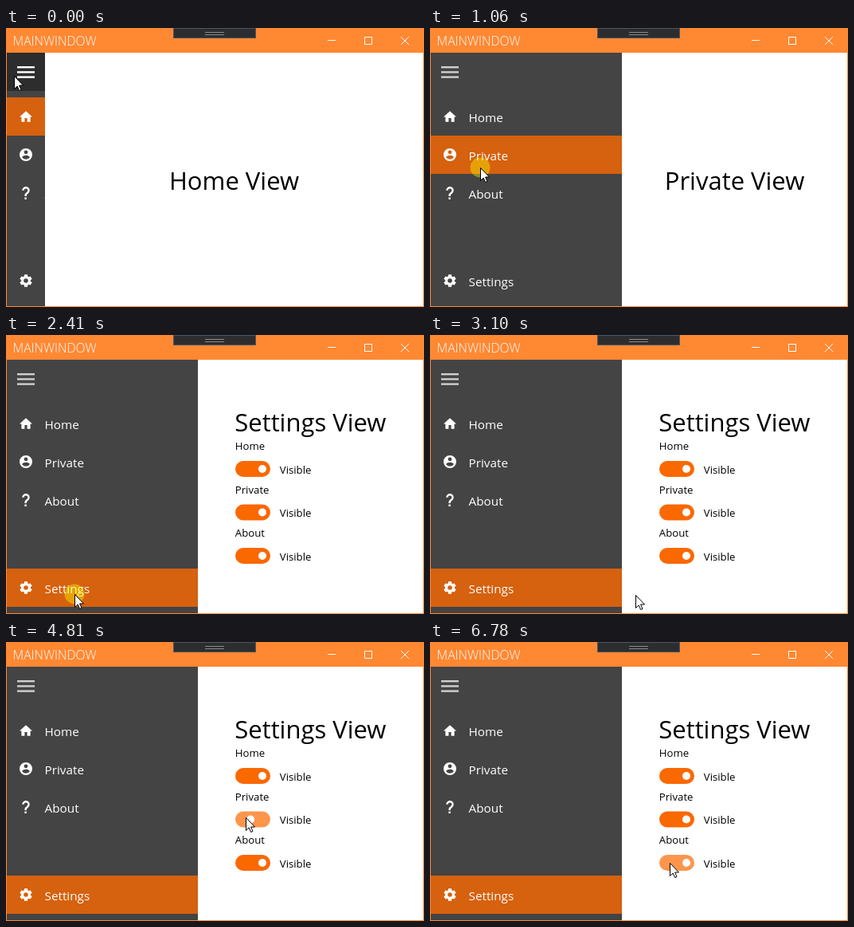
Write an HTML page with a canvas that moves like this. It is 525 by 350 pixels and loops after 7930 ms.

```html
<!DOCTYPE html>
<html lang="en">
<head>
<meta charset="utf-8">
<title>Main window</title>
<style>
  html, body { margin: 0; width: 100%; height: 100%; overflow: hidden; background: #fff; }
  canvas { display: block; }
</style>
</head>
<body>
<canvas id="stage" width="525" height="350"></canvas>
<script>
const ctx = document.getElementById('stage').getContext('2d');
const LOOP = 7930, OPEN_TIME = 350, SLIDE_TIME = 240;
const FONT = '"Open Sans", "Noto Sans", sans-serif';
const ACCENT = '#fa6800', TITLE_BAR = '#ff8833', SELECTED = '#d6610e', PANE = '#444444';
const PAGES = ['Home', 'Private', 'About'];

const smooth = p => p * p * (3 - 2 * p);
const easeOut = p => 1 - (1 - p) ** 3;
const clamp = p => Math.max(0, Math.min(1, p));

// Pointer moves: each starts where the previous one ended
const moves = [
  { start: 40, end: 140, x: 20, y: 60 },
  { start: 400, end: 920, x: 63, y: 175 },
  { start: 1160, end: 1380, x: 67, y: 211 },
  { start: 1560, end: 1820, x: 70, y: 262 },
  { start: 1830, end: 2130, x: 86, y: 325 },
  { start: 2930, end: 3610, x: 301, y: 220, bend: { x: 290, y: 400 }, ease: easeOut },
  { start: 5100, end: 5550, x: 301, y: 277 }
];

// Selecting acts on press, everything else on release
const clicks = [
  { down: 200, up: 290, opens: true },
  { down: 1060, up: 1150, selects: 'Private' },
  { down: 1440, up: 1530, selects: 'About' },
  { down: 2410, up: 2450, selects: 'Settings' },
  { down: 3850, up: 4060, toggles: 'Private' },
  { down: 4630, up: 4720, toggles: 'Private' },
  { down: 5740, up: 5830, toggles: 'About' },
  { down: 6300, up: 6390, toggles: 'About' }
];
const openAt = clicks.find(c => c.opens).up;

// Icons on a 24 unit grid
const icons = {
  Home: new Path2D('M10,20.5v-6h4v6h5v-8h3L12,3.5L2,12.5h3v8Z'),
  Private: new Path2D('M2,12a10,10 0 1,0 20,0a10,10 0 1,0 -20,0M9,8a3,3 0 1,0 6,0a3,3 0 1,0 -6,0M6,16C6,14 10,12.9 12,12.9S18,14 18,16A7.2,7.2 0 0,1 6,16Z'),
  About: new Path2D('M10,19h3v3h-3ZM12,2C17.3,2.2 19.7,7.6 16.5,11.7C14.5,14 13,14 13,17h-3C10,12.5 11.5,12.3 13.5,10.7C15.9,8.4 15.3,5.3 12,5A3,3 0 0,0 9,8H6A6,6 0 0,1 12,2Z'),
  Settings: cogPath()
};
const arrow = new Path2D('M.5,.5V16.5L4.2,13L6.6,18.5L9,17.5L6.6,12H11.5Z');

function cogPath() {
  const path = new Path2D();
  for (let i = 0; i < 6; i++) {
    const middle = i * Math.PI / 3 - Math.PI / 2;
    for (const [r, turn] of [[7.4, -.4], [9.9, -.25], [9.9, .25], [7.4, .4]]) {
      path.lineTo(12 + r * Math.cos(middle + turn), 12 + r * Math.sin(middle + turn));
    }
  }
  path.closePath();
  path.moveTo(15.5, 12);
  path.arc(12, 12, 3.5, 0, 2 * Math.PI);
  return path;
}

function rect(x, y, w, h, color) {
  ctx.fillStyle = color;
  ctx.fillRect(x, y, w, h);
}

function circle(x, y, r, color) {
  ctx.fillStyle = color;
  ctx.beginPath();
  ctx.arc(x, y, r, 0, 2 * Math.PI);
  ctx.fill();
}

function text(str, x, y, size, color = '#000', align = 'left', weight = 400) {
  ctx.font = `${weight} ${size}px ${FONT}`;
  ctx.textAlign = align;
  ctx.fillStyle = color;
  ctx.fillText(str, x, y);
}

const inside = (p, x, y, w, h) => p.x >= x && p.x < x + w && p.y >= y && p.y < y + h;

function pointerAt(t) {
  let from = { x: 10, y: 60 };
  for (const to of moves) {
    if (t < to.start) break;
    const p = (to.ease || smooth)(clamp((t - to.start) / (to.end - to.start)));
    const bend = to.bend || { x: (from.x + to.x) / 2, y: (from.y + to.y) / 2 };
    const along = k => Math.round(
      from[k] * (1 - p) ** 2 + bend[k] * 2 * p * (1 - p) + to[k] * p * p);
    from = { x: along('x'), y: along('y') };
    if (t < to.end) break;
  }
  return from;
}

function viewAt(t) {
  const last = clicks.findLast(c => c.selects && c.down <= t);
  return last ? last.selects : 'Home';
}

function switchAt(name, t) {
  const done = clicks.filter(c => c.toggles === name && c.up <= t);
  const off = done.length % 2 === 1;
  const slide = done.length ? clamp((t - done.at(-1).up) / SLIDE_TIME) : 1;
  return { off, knob: off ? 322 - 24 * slide : 298 + 24 * slide };
}

function drawTitleBar() {
  rect(0, 0, 525, 31, TITLE_BAR);
  ctx.strokeStyle = TITLE_BAR;
  ctx.lineWidth = 1;
  ctx.strokeRect(.5, .5, 524, 349);
  text('MAINWINDOW', 8.5, 22, 15.8, '#fff', 'left', 300);

  ctx.strokeStyle = '#fff';
  ctx.beginPath();
  ctx.moveTo(404, 15.5); ctx.lineTo(414, 15.5);
  ctx.rect(450.5, 11.5, 9, 9);
  ctx.moveTo(496, 11); ctx.lineTo(506, 21);
  ctx.moveTo(506, 11); ctx.lineTo(496, 21);
  ctx.stroke();

  rect(210, 0, 104, 13, '#4b5563');
  rect(211, 1, 102, 11, '#2d2d30');
  rect(250, 5, 24, 1, '#8a8a8a');
  rect(250, 8, 24, 1, '#8a8a8a');
}

function drawItem(name, y, view, pointer) {
  if (name === view) rect(1, y, 240, 48, SELECTED);
  else if (inside(pointer, 1, y, 240, 48)) rect(1, y, 240, 48, '#535353');
  ctx.save();
  ctx.translate(25, y + 24);
  ctx.scale(.8, .8);
  ctx.translate(-12, -12);
  ctx.fillStyle = '#fff';
  ctx.fill(icons[name], 'evenodd');
  ctx.restore();
  text(name, 48.5, y + 31, 15.3, '#fff');
}

function drawPane(t, view, pointer) {
  const p = clamp((t - openAt) / OPEN_TIME);
  ctx.save();
  ctx.beginPath();
  ctx.rect(1, 31, 48 + 192 * (1 - (1 - p) ** 5), 318);
  ctx.clip();
  rect(1, 31, 240, 318, PANE);

  const hovered = inside(pointer, 1, 31, 48, 48);
  if (hovered) rect(1, 31, 48, 48, '#2d2d2d');
  for (let i = 0; i < 3; i++) rect(14, 48 + 6.2 * i, 22, 2.4, hovered ? '#fff' : '#cfcfcf');

  PAGES.filter(name => !switchAt(name, t).off)
    .forEach((name, i) => drawItem(name, 87 + 48 * i, view, pointer));
  drawItem('Settings', 293, view, pointer);
  ctx.restore();
}

function drawSwitch(name, y, t, pointer) {
  const { off, knob } = switchAt(name, t);
  text(name, 287.8, Math.round(y - 24), 13.2);
  ctx.beginPath();
  if (off) {
    ctx.roundRect(289, y - 9, 42, 18, 9);
    ctx.strokeStyle = '#000';
    ctx.lineWidth = 2;
    ctx.stroke();
  } else {
    ctx.roundRect(288, y - 10, 44, 20, 10);
    ctx.fillStyle = inside(pointer, 288, y - 10, 44, 20) ? '#fd954c' : ACCENT;
    ctx.fill();
  }
  circle(knob, y, 5, off ? '#000' : '#fff');
  text(off ? 'Collapsed' : 'Visible', 343.8, Math.floor(y + 6), 13.2);
}

function drawContent(t, view, pointer) {
  if (view === 'Settings') {
    text('Settings View', 287.3, 121, 31);
    PAGES.forEach((name, i) => drawSwitch(name, 168 + 54.5 * i, t, pointer));
  } else {
    text(view + ' View', t < openAt ? 286.5 : 382.5, 203, 31, '#000', 'center');
  }
}

function drawPointer(t, { x, y }) {
  if (clicks.some(c => t >= c.down && t < c.up)) circle(x, y, 12.5, 'rgba(255, 255, 0, .4)');
  ctx.save();
  ctx.translate(x, y);
  ctx.fillStyle = '#fff';
  ctx.strokeStyle = '#000';
  ctx.lineWidth = 1;
  ctx.fill(arrow);
  ctx.stroke(arrow);
  ctx.restore();
}

function draw(t) {
  const pointer = pointerAt(t);
  const view = viewAt(t);
  rect(0, 0, 525, 350, '#fff');
  drawContent(t, view, pointer);
  drawPane(t, view, pointer);
  drawTitleBar();
  drawPointer(t, pointer);
}

const start = performance.now();
function tick() {
  draw((performance.now() - start) % LOOP);
  requestAnimationFrame(tick);
}
tick();
</script>
</body>
</html>
```
